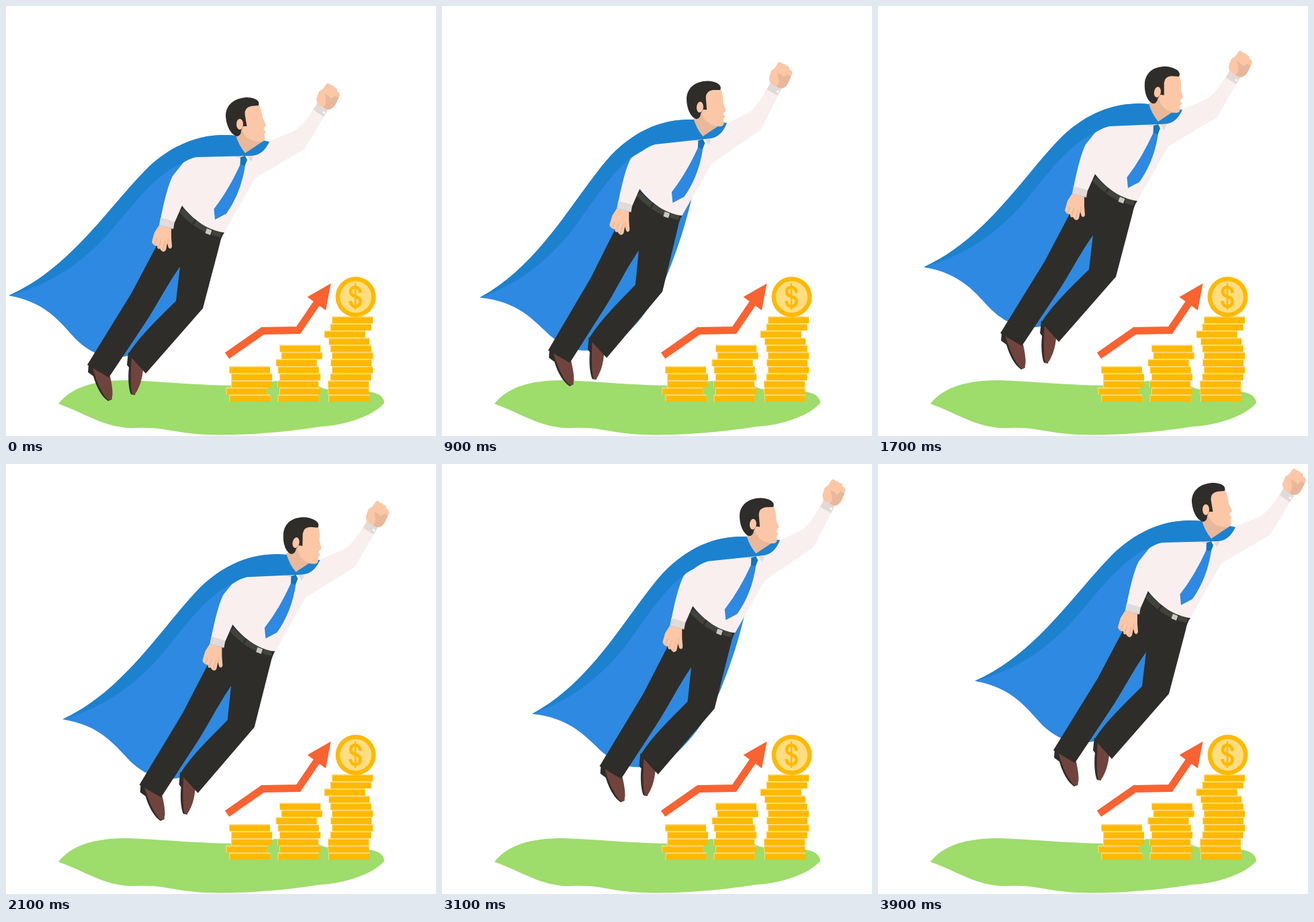
These frames come from a looping animation (640x640 px, 4000 ms). An HTML page:

```html
<!DOCTYPE html>
<html lang="en">
<head>
<meta charset="utf-8">
<style>
  html, body { margin: 0; width: 100%; height: 100%; overflow: hidden; background: #fff; }
  svg { display: block; width: 100%; height: 100%; }
  .cape { fill: #2d89e1; }
  .band { fill: #1c82cf; }
  .shirt { fill: #f9efef; }
  .cuff { fill: #e2dad9; }
  .dark { fill: #2e2d29; }
  .sole { fill: #302c29; }
  .shoe { fill: #70443c; }
  .skin { fill: #fbc7a7; }
  .shade { fill: #e9b799; }
  .gold { fill: #ffb900; }
  .pale { fill: #ffdd82; }
  .line { fill: none; }
</style>
</head>
<body>
<svg viewBox="0 0 640 640">
  <path fill="#9edc6c" d="M78 592C96 570 125 557 180 557C235 559 300 566 370 565Q390 564 397 559Q403 556 408 562L466 566Q472 570 481 571L541 574Q562 577 563 591C545 611 505 624 468 626C420 634 350 640 300 638C250 636 235 626 195 628C150 630 122 608 78 592Z"/>
  <g id="coins"></g>
  <path class="line" stroke="#f96331" stroke-width="11" d="M329 520.500L382 483.500L435 482.500L464 440"/>
  <path fill="#f96331" d="M483.500 413L448.500 433L476 453Z"/>
  <circle class="gold" cx="520.500" cy="433" r="30"/>
  <circle class="pale" cx="520.500" cy="433" r="23.500"/>
  <path class="line" stroke="#ffb900" stroke-width="4.700" d="M527.500 427C527 416 513 416 513 425C513 435 527.500 430 527.500 440C527.500 450 513 450 512.500 439"/>
  <path class="line" stroke="#ffb900" stroke-width="2.500" d="M520 413V452"/>

  <g id="man">
    <path id="cape" class="cape" d="M4 431C98 390 156 294 214 238C256 200 300 188 343 193L345 260C328 325 310 370 285 420C262 460 240 485 215 505C195 520 172 526 145 521Q122 514 104 496C80 470 60 441 4 431Z"/>
    <g id="legs">
      <path class="sole" d="M123 533L122 545L130 551C135 568 142 581 152 588L158 585L140 545Z"/>
      <path class="shoe" d="M128 536L155 551Q159 569 158.500 579L157 586Q152 588 148 582Q137 568 128 536Z"/>
      <path class="sole" d="M182 515L180 534L183 538C181 555 183 572 186 578L192 579L195 535Z"/>
      <path class="shoe" d="M187 518L204 542Q202 560 196 571Q192 580 188 578Q184 568 187 518Z"/>
      <path class="dark" d="M262 297C278 318 302 335 325 337Q320 344 318 355L293 450L208 547L182 518C199 491 225 467 253 439L259 388C237 419 224 447 205 475L153 553L121 534L187 427L224 357L249 315Z"/>
      <path class="line" stroke="#42433a" stroke-width="8" d="M260.500 304C276 321 297 336 320 340"/>
      <path class="line" stroke="#2e2d29" stroke-width="2.500" d="M283 317L278 325M307 332L304 343"/>
      <path fill="#c9c7c2" d="M299 331L306.500 334L304 341L296.500 338Z"/>
    </g>
    <path class="skin" d="M228 326L246 331L246 345L247 358Q246 363 242 360L240 353L238 363Q235 368 231 364L229 361Q225 363 225 357Q219 357 217 351L221 337Z"/>
    <path class="line" stroke="#e9b799" stroke-width="1.500" d="M225 346L221 355M231 348L227 360M237 350L233 364M241 346L241 354"/>
    <g id="arm">
      <path class="skin" d="M462 138L466 127L472 123L477 116Q480 113 484 118Q488 118 489 121Q494 122 493 127Q497 128 497 133L490 147Q485 155 478 154L473 158L464 150Z"/>
      <path class="shade" d="M475 131Q480 133 484 138L490 134L495 137L490 147Q485 155 478 154L473 158L470 152Q478 147 476 140Z"/>
      <path class="cuff" d="M463 145L479 155L473 165L457 155Z"/>
      <circle fill="#fff" cx="473.500" cy="158.500" r="1.700"/>
      <path class="shirt" d="M345 225L385 204L431 185Q447 171 457 154L473 165L444 213L371 256L345 275Z"/>
    </g>
    <path class="shirt" d="M343 205L300 213Q278 224 264 233L248 253Q239 271 230 317L251 322L262 297C278 318 302 335 325 337L371 256L388 206Z"/>
    <path class="cuff" d="M230 315L251 321L249 332L228 326Z"/>
    <path class="cuff" d="M337 226L351 220L349 227L342 225ZM358 221L368 224L365 232Z"/>
    <path class="cape" d="M349 235L356 237Q350 278 328 309L311 318L309.500 302Q332 273 349 235Z"/>
    <path fill="#1275bd" d="M349 225L356 223L359 229L355.500 238L348.500 236Z"/>
    <path id="band" class="band" d="M4 431C98 390 156 294 214 238C256 200 300 188 343 193L356 206L383 200L392 202Q382 224 362 223L283 225Q273 227 262 234C215 253 175 317 140 352C100 391 60 416 4 431Z"/>
    <path class="shade" d="M342 192L355 180L384 197L383 201L356 219Q346 207 342 192Z"/>
    <g id="head">
      <path class="shade" d="M343 186L358 178L378 202L366 204L350 198Z"/>
      <path class="skin" d="M355 152L366 147L377 148Q381 155 382 167L386 175Q388 179 384 181L383.500 184L387 187L384.500 190L385.500 198Q384 203 375 202Q356 200 351 183Z"/>
      <path class="dark" d="M376 148C379 139 367 136 357 136C337 138 327 149 327 164C328 179 335 192 344 194Q350 193 350 185L353 179L358.500 179L355.500 161Q355 151 365 149Z"/>
      <ellipse class="skin" cx="348" cy="176" rx="5" ry="8"/>
    </g>
  </g>
</svg>
<script>
const LOOP = 4000, STEP = 100, END = 3900;
const el = id => document.getElementById(id);

// Left edges of the coins, each stack listed from the top down.
const stacks = [
  [333, 336, 336, 328.500, 333.500],
  [408, 410.500, 402.500, 405.500, 408, 405, 408, 405.500],
  [486, 483.500, 474.500, 481, 483.500, 486, 484, 486, 483.500, 480, 480, 481]
];
el('coins').innerHTML = stacks.map(stack => stack.map((x, i) => {
  const y = 589.800 - 10.600 * (stack.length - i);
  return `<rect class="pale" x="${x - 1}" y="${y - .8}" width="61" height="10.600"/>
    <rect class="gold" x="${x}" y="${y + .8}" width="60" height="9"/>`;
}).join('')).join('');

// Linear interpolation through [time, value] keys.
function track(keys, t) {
  const i = Math.max(1, keys.findIndex(k => k[0] >= t));
  const [t0, a] = keys[i - 1], [t1, b] = keys[i];
  return a + (b - a) * (t - t0) / (t1 - t0);
}
const swing = [[0, 0], [975, 1], [1830, 0], [2990, 1], [END, 0]];
const nod = [[0, 0], [2050, 11], [END, 0]];
const kick = [[0, 0], [600, 1.3], [900, 1.2], [1300, .1], [1800, 0], [2500, 1.3], [3500, .1], [END, 0]];

const turn = (id, angle, x, y) => el(id).setAttribute('transform', `rotate(${angle} ${x} ${y})`);

function draw(now) {
  const t = Math.floor(now % LOOP / STEP) * STEP;
  const s = track(swing, t);
  el('man').setAttribute('transform', `translate(${140 * t / END} ${-108 * t / END})`);
  turn('cape', -5.1 * s, 355, 205);
  turn('band', -5.1 * s, 355, 205);
  turn('arm', -4.7 * s, 388, 235);
  turn('legs', -track(kick, t), 290, 315);
  turn('head', track(nod, t), 356, 219);
}

const start = performance.now();
(function frame() {
  draw(performance.now() - start);
  requestAnimationFrame(frame);
})();
</script>
</body>
</html>
```
